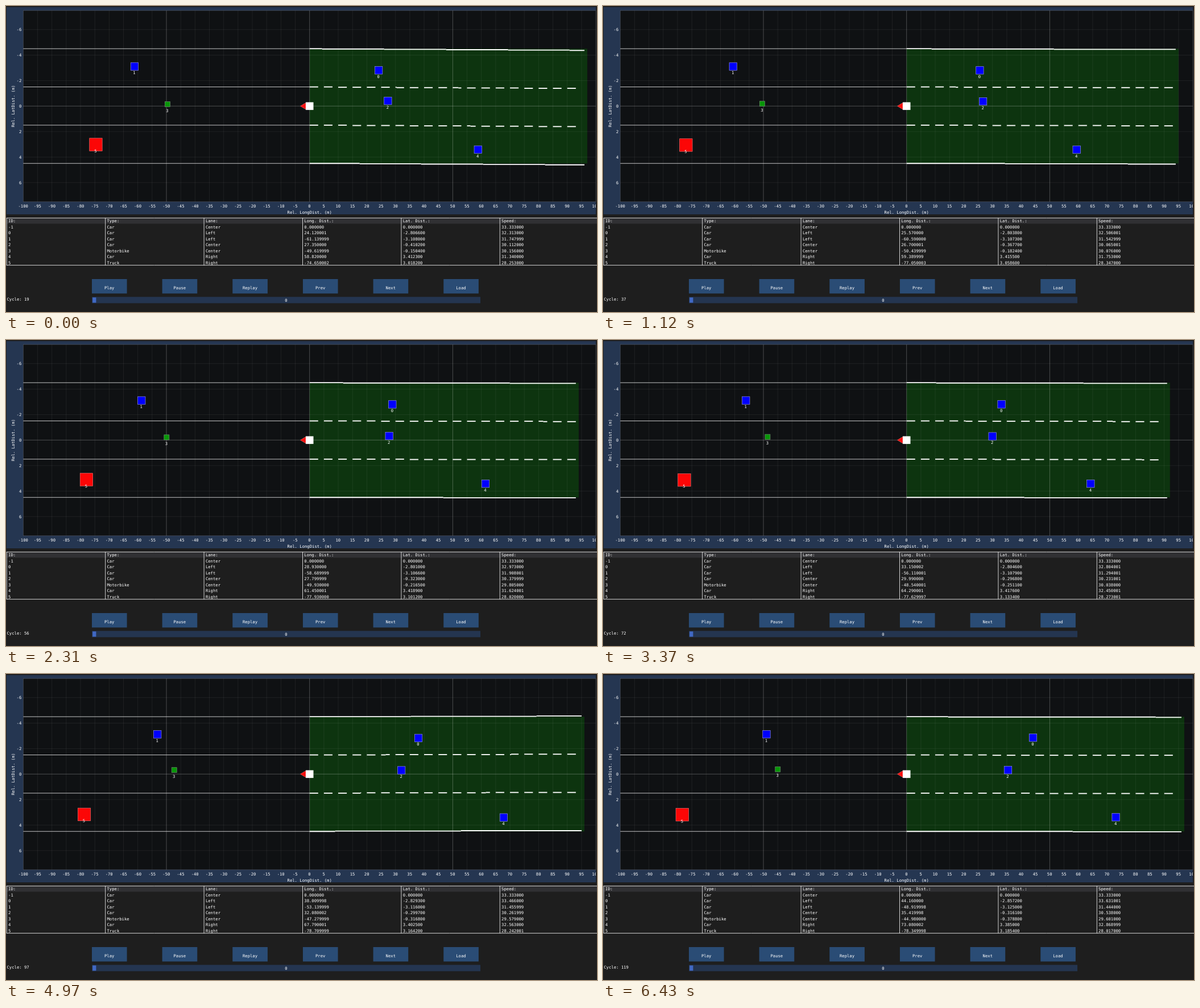
Animation, 1039 px wide and 539 px high, one loop 6.5 s. Source, as an HTML page with a canvas:

```html
<!DOCTYPE html>
<html lang="en">
<head>
<meta charset="utf-8">
<title>Traffic replay</title>
<style>
  html, body { margin: 0; width: 100%; height: 100%; overflow: hidden; background: #1e1e1e; }
  canvas { display: block; width: 1039px; height: 539px; }
</style>
</head>
<body>
<canvas id="stage"></canvas>
<script>
const W = 1039, H = 539, LOOP = 6500;
const canvas = document.getElementById('stage');
const dpr = window.devicePixelRatio || 1;
canvas.width = W * dpr;
canvas.height = H * dpr;
const ctx = canvas.getContext('2d');

const WHITE = '#ffffff';
const PLOT = { l: 30.3, t: 8, r: 1037, b: 344.8 };
const px = m => 533.7 + m * 5.0335;
const py = m => 176.3 + m * 22.45;

// Quarter marks of the drive; a path has 5, 3 or 2 points spread over them
const LAST = 96;
const MARKS = [0, 25, 51, 75, LAST];

const KIND = {
  Car: { size: 13.4, fill: '#0000ff', edge: '#9090e8' },
  Motorbike: { size: 9, fill: '#089608', edge: '#6f8f6f' },
  Truck: { size: 22.4, fill: '#fc0606', edge: '#e87070' }
};

const vehicle = (type, lane, x, y, speed) => ({ type, lane, x, y, speed });
const vehicles = [
  vehicle('Car', 'Left', [24.12, 26.66, 33.15, 38.01, 44.16], [-2.8066, -2.8046, -2.8572], [32.313, 33.631]),
  vehicle('Car', 'Left', [-61.14, -60.03, -56.11, -53.14, -48.92], [-3.108, -3.1079, -3.125], [31.748, 31.444]),
  vehicle('Car', 'Center', [27.35, 26.8, 29.99, 32.08, 35.42], [-.4102, -.2968, -.3161], [30.112, 30.538]),
  vehicle('Motorbike', 'Center', [-49.62, -50.51, -48.54, -47.28, -44.98], [-.1504, -.2511, -.3788], [30.156, 29.601]),
  vehicle('Car', 'Right', [58.82, 59.99, 64.29, 67.79, 73.08], [3.4123, 3.4176, 3.385], [31.34, 32.869]),
  vehicle('Truck', 'Right', [-74.65, -77.81, -77.63, -78.71, -78.35], [3.0182, 3.1334, 3.1854], [28.253, 28.017])
];

// Smooth curve through evenly chosen marks
function along(k, pts) {
  const n = pts.length - 1;
  const mark = i => MARKS[i * 4 / n];
  const slope = i => {
    const a = Math.max(i - 1, 0), b = Math.min(i + 1, n);
    return (pts[b] - pts[a]) / (mark(b) - mark(a));
  };
  let i = 0;
  while (i < n - 1 && k >= mark(i + 1)) i++;
  const span = mark(i + 1) - mark(i), u = (k - mark(i)) / span, v = 1 - u;
  return v * v * (1 + 2 * u) * pts[i] + u * u * (1 + 2 * v) * pts[i + 1]
    + span * u * v * (v * slope(i) - u * slope(i + 1));
}

// About 15 steps a second; one late step is held twice as long
function stepAt(t) {
  const k = Math.min(Math.floor(t / 65), Math.floor((t + 17) / 66.4), LAST + 1);
  return k > 91 ? k - 1 : k;
}

const cycleAt = k => 19 + Math.round(k * 1.045);
const bendAt = k => along(k, [.0057, .002, .0024, -.0028, .0017]);
const rangeAt = k => Math.round(along(k, [96, 91, 91, 95, 95]) + 3 * Math.sin(k * Math.PI / 25) ** 2);
const speedAt = (v, id, k) =>
  along(k, v.speed) + .3 * Math.sin(k / 5 + id) * Math.sin(k / LAST * Math.PI);

function rect(x0, y0, x1, y1, color) {
  ctx.fillStyle = color;
  ctx.fillRect(x0, y0, x1 - x0, y1 - y0);
}

function line(x0, y0, x1, y1, color, width = 1) {
  ctx.strokeStyle = color;
  ctx.lineWidth = width;
  ctx.beginPath();
  ctx.moveTo(x0, y0);
  ctx.lineTo(x1, y1);
  ctx.stroke();
}

function text(str, x, y, align = 'left') {
  ctx.font = '7.22px "DejaVu Sans Mono", monospace';
  ctx.fillStyle = WHITE;
  ctx.textAlign = align;
  ctx.fillText(str, x, y + 2.6);
}

function drawGrid() {
  const faint = 'rgba(255,255,255,.065)', strong = 'rgba(255,255,255,.25)';
  for (let m = -95; m <= 95; m += 5) {
    line(px(m), PLOT.t, px(m), PLOT.b, m % 50 ? faint : strong);
  }
  for (let m = -6; m <= 6; m += 2) {
    line(PLOT.l, py(m), PLOT.r, py(m), m ? faint : strong);
  }
}

function drawAxes() {
  ctx.strokeStyle = 'rgba(140,140,150,.45)';
  ctx.lineWidth = 0.7;
  ctx.strokeRect(PLOT.l, PLOT.t, PLOT.r - PLOT.l, PLOT.b - PLOT.t);
  ctx.save();
  ctx.beginPath();
  ctx.rect(0, 0, PLOT.r, H);
  ctx.clip();
  for (let m = -100; m <= 100; m += 5) text(String(m), px(m) - 0.2, 352, 'center');
  ctx.restore();
  for (let m = -6; m <= 6; m += 2) text(String(m), 27.3, py(m), 'right');
  text('Rel. LongDist. (m)', 533.7, 363, 'center');
  ctx.save();
  ctx.translate(12, 176.3);
  ctx.rotate(-Math.PI / 2);
  text('Rel. LatDist. (m)', 0, 0, 'center');
  ctx.restore();
}

// Lane marks snap to rows, so a slanted line shows as small stairs
function drawLane(i, bend, range) {
  const ROW = 0.62, base = py(-4.5 + i * 3) - 0.1, limit = 0.2 * (i + 1);
  const yAt = x => base + ROW * Math.ceil((x - px(0)) * bend / ROW - limit);
  const mark = (from, to) => {
    let start = from, y = yAt(from);
    for (let x = from; x < to; x++) {
      const next = yAt(x);
      if (next !== y) {
        line(start, y, x, y, WHITE, 1.86);
        start = x;
        y = next;
      }
    }
    line(start, y, to, y, WHITE, 1.86);
  };
  line(PLOT.l, base, px(0), base, WHITE, 0.75);
  if (i % 3 === 0) mark(px(0), px(range));
  else for (let m = 0; m + 3 <= range; m += 5) mark(px(m), px(m + 3));
}

function drawEgo() {
  const y = py(0);
  ctx.fillStyle = '#f81010';
  ctx.strokeStyle = '#e07070';
  ctx.lineWidth = 0.6;
  ctx.beginPath();
  ctx.moveTo(517.5, y);
  ctx.lineTo(527, y - 5.8);
  ctx.lineTo(527, y + 5.8);
  ctx.closePath();
  ctx.fill();
  ctx.stroke();
  rect(527, y - 6.8, 540.5, y + 6.8, WHITE);
}

function drawVehicle(v, id, k) {
  const { size, fill, edge } = KIND[v.type];
  const x = px(along(k, v.x)), y = py(along(k, v.y)), h = size / 2;
  rect(x - h, y - h, x + h, y + h, fill);
  ctx.strokeStyle = edge;
  ctx.lineWidth = 0.7;
  ctx.strokeRect(x - h, y - h, size, size);
  text(String(id), x - 0.5, y + 11.1, 'center');
}

function drawPlot(k) {
  const range = rangeAt(k), bend = bendAt(k);
  rect(1, 2, PLOT.r, 367, '#253651');
  rect(PLOT.l, PLOT.t, PLOT.r, PLOT.b, '#0f1113');
  rect(px(0), py(-4.5), px(range + 1), py(4.5), '#0d340f');
  drawGrid();
  for (let i = 0; i < 4; i++) drawLane(i, bend, range);
  drawEgo();
  vehicles.forEach((v, id) => drawVehicle(v, id, k));
  drawAxes();
}

function drawTable(k) {
  const left = c => 1.3 + c * 173.4;
  // Readings are rounded, then kept as single precision floats
  const reading = (v, digits) => Math.fround(Number(v.toFixed(digits))).toFixed(6);
  const rows = [
    ['ID:', 'Type:', 'Lane:', 'Long. Dist.:', 'Lat. Dist.:', 'Speed:'],
    ['-1', 'Car', 'Center', '0.000000', '0.000000', '33.333000'],
    ...vehicles.map((v, id) => [
      String(id), v.type, v.lane,
      reading(along(k, v.x), 2), reading(along(k, v.y), 4), reading(speedAt(v, id, k), 3)
    ])
  ];
  rect(1, 373, W, 383.5, '#303033');
  for (const y of [373.4, 456.6]) line(1, y, W, y, WHITE, 0.8);
  rows[0].forEach((_, c) => line(left(c), 373, left(c), 457, WHITE, 0.8));
  rows.forEach((row, r) => row.forEach((cell, c) => text(cell, left(c) + 2.8, 378.6 + r * 10.48)));
}

function drawControls(k) {
  ['Play', 'Pause', 'Replay', 'Prev', 'Next', 'Load'].forEach((name, i) => {
    const x = 151 + i * 123.65;
    rect(x, 481, x + 61.6, 506.4, '#2a4c75');
    text(name, x + 30.7, 496.3, 'center');
  });
  rect(151, 512.4, 834, 523.5, '#243550');
  rect(152.2, 513.4, 158.4, 522.6, '#4169c4');
  text('0', 492.5, 518, 'center');
  text('Cycle: ' + cycleAt(k), 1.5, 516.6);
}

function draw(t) {
  const k = stepAt(t);
  ctx.setTransform(dpr, 0, 0, dpr, 0, 0);
  rect(0, 0, W, H, '#1e1e1e');
  drawPlot(k);
  drawTable(k);
  drawControls(k);
}

const start = performance.now();
function tick() {
  draw((performance.now() - start) % LOOP);
  requestAnimationFrame(tick);
}
tick();
</script>
</body>
</html>
```
